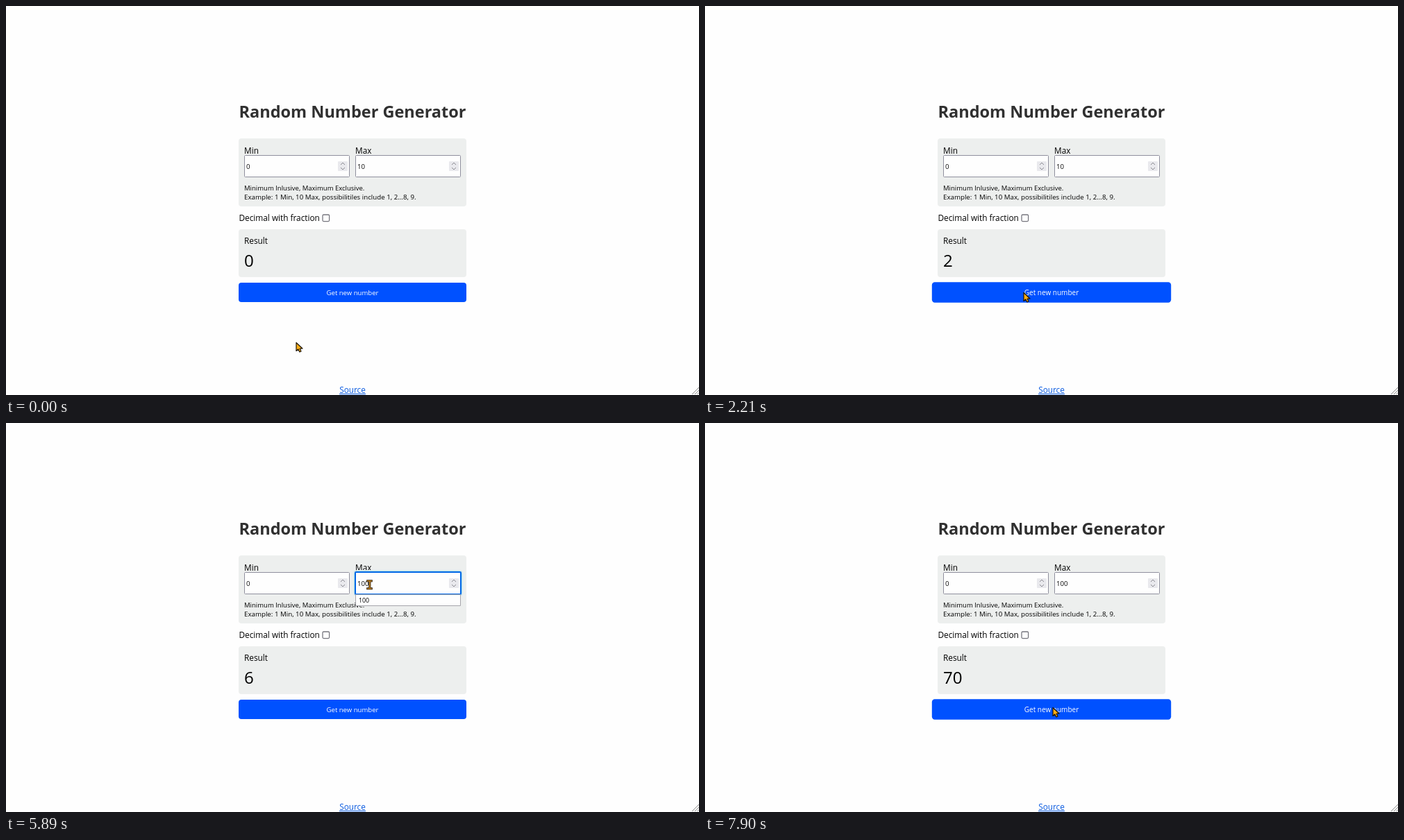
Recreate the animation shown at these times as an HTML page with a canvas. Size 998 by 561 pixels, loop 8000 ms.

```html
<!DOCTYPE html>
<html lang="en">
<head>
<meta charset="utf-8">
<title>Random Number Generator</title>
<style>
  html, body { margin: 0; width: 100%; height: 100%; overflow: hidden; background: #fefefe; }
  canvas { display: block; }
</style>
</head>
<body>
<canvas id="stage" width="998" height="561"></canvas>
<script>
const ctx = document.getElementById('stage').getContext('2d');
const LOOP = 8000, STEP = 70;
const SANS = '"Open Sans", "Noto Sans", sans-serif';
const BLUE = '#0051ff', PRESSED = '#0b3283', PANEL = '#edefee';

// Pointer path: time, x, y of the tip.
const path = [
  [0, 418, 485], [350, 440, 450], [630, 459, 413],
  [3150, 459, 413], [3220, 429, 352], [3500, 450, 284], [3710, 496, 246], [3990, 523, 233],
  [6070, 523, 233], [6210, 520, 285], [6430, 503, 395], [6500, 501, 410]
];
const presses = [[890, 1030], [1490, 1620], [2080, 2210], [2610, 2740],
  [6570, 6690], [7090, 7170], [7440, 7570], [7770, 7900]];
const results = [[0, '0'], [890, '3'], [1490, '6'], [2080, '2'], [2610, '6'],
  [6570, '57'], [7090, '93'], [7440, '41'], [7770, '70']];
const FOCUS = 4130, BLUR = 6570, TYPED = 5210, POPUP = 5280;

const within = (t, a, b) => t >= a && t < b;

function text(str, x, y, size, color = '#000', align = 'left', weight = 400) {
  ctx.font = `${weight} ${size}px ${SANS}`;
  ctx.fillStyle = color;
  ctx.textAlign = align;
  ctx.fillText(str, x, y);
}

function box(x, y, w, h, r, fill, stroke, line = 1) {
  ctx.beginPath();
  ctx.roundRect(x, y, w, h, r);
  if (fill) { ctx.fillStyle = fill; ctx.fill(); }
  if (stroke) { ctx.strokeStyle = stroke; ctx.lineWidth = line; ctx.stroke(); }
}

function polyline(points, color, width = 1) {
  ctx.beginPath();
  points.forEach(([x, y]) => ctx.lineTo(x, y));
  ctx.strokeStyle = color;
  ctx.lineWidth = width;
  ctx.stroke();
}

// The pointer moves in discrete steps counted from the start of each segment.
function pointerAt(t) {
  const i = path.findIndex(p => p[0] > t);
  if (i < 0) return path[path.length - 1].slice(1);
  const [t0, x0, y0] = path[i - 1], [t1, x1, y1] = path[i];
  const k = Math.floor((t - t0) / STEP) * STEP / (t1 - t0);
  return [x0 + (x1 - x0) * k, y0 + (y1 - y0) * k];
}

function numberField(x, value, { hover = false, focus = false, glow = 0 } = {}) {
  if (focus) {
    ctx.globalAlpha = glow;
    box(x - 2.5, 212.5, 157, 37, 4, null, '#d9eaec');
    box(x - 1.5, 213.5, 155, 35, 3, null, '#bfe5e9');
    ctx.globalAlpha = 1;
    box(x, 215, 152, 32, 1, '#fefefe', '#0067e6', 2);
  } else {
    box(x + .5, 215.5, 151, 31, 1, '#fefefe', hover ? '#676774' : '#8f8f9d');
  }
  text(value, x + 3, 235, 9.6);
  box(x + 135, 224, 14, 14, 1, '#e9e9ed');
  const cx = x + 142;
  polyline([[cx - 3, 229], [cx, 226], [cx + 3, 229]], '#8b8b92');
  polyline([[cx - 3, 233], [cx, 236], [cx + 3, 233]], '#8b8b92');
}

function button(hover, pressed) {
  ctx.save();
  ctx.translate(499, 413);
  if (hover) ctx.scale(1.05, 1.05);
  box(-164, -14, 328, 28, 4, pressed ? PRESSED : BLUE);
  text('Get new number', 0, 3.7, 9.55, '#fff', 'center');
  ctx.restore();
}

function arrow(x, y) {
  ctx.save();
  ctx.translate(x, y);
  ctx.beginPath();
  [[0, .5], [0, 12.5], [2.8, 10], [4.8, 14], [7, 13], [5.2, 9.2], [9, 9]]
    .forEach(([px, py]) => ctx.lineTo(px, py));
  ctx.closePath();
  ctx.fillStyle = '#fdae17';
  ctx.fill();
  ctx.strokeStyle = '#1c1408';
  ctx.lineWidth = 1.2;
  ctx.lineJoin = 'round';
  ctx.stroke();
  ctx.restore();
}

function beam(x, y) {
  const shape = grow => {
    ctx.fillRect(x - 3 - grow, y - 6 - grow, 7 + 2 * grow, 1.5 + 2 * grow);
    ctx.fillRect(x - 3 - grow, y + 5 - grow, 7 + 2 * grow, 1.5 + 2 * grow);
    ctx.fillRect(x - grow, y - 6, 1.6 + 2 * grow, 12);
  };
  ctx.fillStyle = '#2b2012';
  shape(.8);
  ctx.fillStyle = '#b77a1c';
  shape(0);
}

function draw(t) {
  const [px, py] = pointerAt(t);
  const onButton = px > 335 && px < 663 && py > 398 && py < 428;
  const onField = px > 503 && px < 655 && py > 215 && py < 247;
  const pressed = presses.some(([a, b]) => within(t, a, b));
  const focus = within(t, FOCUS, BLUR);

  ctx.fillStyle = '#fefefe';
  ctx.fillRect(0, 0, 998, 561);

  text('Random Number Generator', 499, 160.5, 23.5, '#303030', 'center', 700);

  box(335, 191, 328, 98, 4, PANEL);
  text('Min', 343, 212.5, 11.8);
  text('Max', 503, 212.5, 11.8);
  numberField(343, '0');
  numberField(503, t < TYPED ? '10' : '100',
    { hover: onField, focus, glow: Math.min(1, (t - FOCUS) / 280) });
  text('Minimum Inlusive, Maximum Exclusive.', 343, 265.5, 9.5);
  text('Example: 1 Min, 10 Max, possibilitiles include 1, 2...8, 9.', 343, 278.7, 9.73);

  const caretOff = within(t, 4810, TYPED) || within(t, 5890, 6390);
  if (focus && !caretOff) {
    ctx.fillStyle = '#000';
    ctx.fillRect(t < TYPED ? 517 : 522, 225, 1, 12);
  }
  if (within(t, POPUP, BLUR)) {
    box(503.5, 247.5, 151, 16, 0, '#fefefe', '#a5a5ab');
    text('100', 508, 259, 8.8);
  }

  text('Decimal with fraction', 335.5, 310, 11.8);
  box(456, 301, 9.6, 9.6, 1.5, '#fefefe', '#77777f', 1.3);

  box(335, 322, 328, 69, 4, PANEL);
  text('Result', 343, 342.7, 11.8);
  text(results.filter(r => r[0] <= t).pop()[1], 343, 375.5, 24.1);
  button(onButton, pressed);

  text('Source', 499, 557.7, 11.8, '#0a5be0', 'center');
  ctx.fillRect(480, 559, 38, 1);

  [10, 6, 2.5].forEach(d => polyline([[998 - d, 560], [998, 560 - d]], '#8a8a8a'));

  if (pressed || within(t, FOCUS, 4270)) {
    ctx.beginPath();
    ctx.arc(px, py, 9.5, 0, Math.PI * 2);
    ctx.fillStyle = 'rgba(255, 165, 50, .52)';
    ctx.fill();
  }
  (onField ? beam : arrow)(px, py);
}

function frame(now) {
  draw(now % LOOP);
  requestAnimationFrame(frame);
}
requestAnimationFrame(frame);
</script>
</body>
</html>
```
